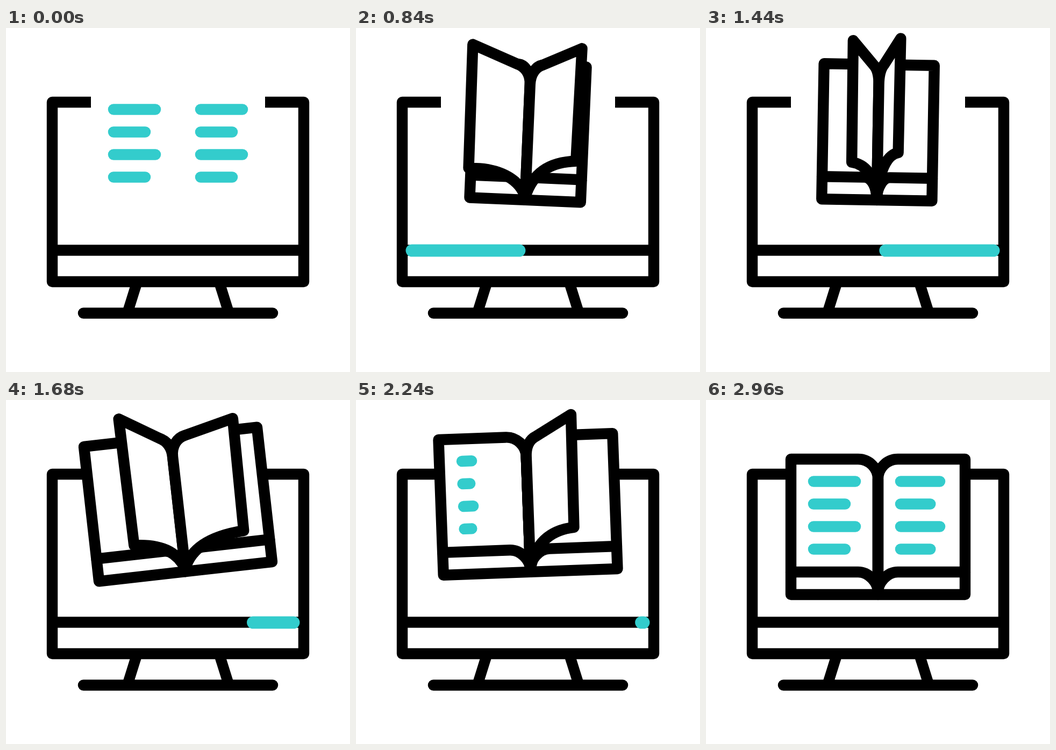
An HTML page with a canvas for the animation above (3000 ms loop, 640 px wide and 640 px high).

```html
<!DOCTYPE html>
<html lang="en">
<head>
<meta charset="utf-8">
<title>Online reading</title>
<style>
  html, body { margin: 0; width: 100%; height: 100%; overflow: hidden; background: #fff; }
  canvas { display: block; width: 100vmin; height: 100vmin; }
</style>
</head>
<body>
<canvas id="stage" width="640" height="640"></canvas>
<script>
const ctx = document.getElementById('stage').getContext('2d');
const LOOP = 3000, STEP = 40;
const INK = '#000', TEAL = '#33cccc';
const W = 162, TOP = -126, FOOT = 126, PAGE_FOOT = 84, BEND = 37;
const BOOK_IN = 620;

const clamp = v => Math.max(0, Math.min(1, v));
const mix = (a, b, u) => a + (b - a) * u;
const ramp = (t, a, b) => clamp((t - a) / (b - a));
const smooth = (t, a, b) => { const u = ramp(t, a, b); return u * u * (3 - 2 * u); };

// Monotone cubic through [time, value] keys, flat at both ends and at extremes.
function track(t, keys) {
  const n = keys.length - 1;
  if (t <= keys[0][0]) return keys[0][1];
  if (t >= keys[n][0]) return keys[n][1];
  let i = 0;
  while (t > keys[i + 1][0]) i++;
  const slope = j => (keys[j + 1][1] - keys[j][1]) / (keys[j + 1][0] - keys[j][0]);
  const tangent = j => {
    if (j === 0 || j === n) return 0;
    const a = slope(j - 1), b = slope(j);
    return a * b <= 0 ? 0 : 2 * a * b / (a + b);
  };
  const [t0, v0] = keys[i], [t1, v1] = keys[i + 1];
  const d = t1 - t0, u = (t - t0) / d, u2 = u * u, u3 = u2 * u;
  return v0 * (2 * u3 - 3 * u2 + 1) + v1 * (3 * u2 - 2 * u3)
    + d * (tangent(i) * (u3 - 2 * u2 + u) + tangent(i + 1) * (u3 - u2));
}

const TILT = [[640, 0], [1200, 8.4], [1680, -6.4], [2240, -2.1], [2440, 0]];
const SPREAD = [[620, 1], [1160, 0], [1210, 0], [1600, 1]];
const LEFT = [[620, W], [1140, 26], [1200, 26], [1680, 92], [2020, W]];
const RIGHT = [[620, W], [1160, -26], [1230, -26], [1680, 119], [1960, 70],
  [2070, 70], [2240, 86], [2320, 106], [2440, W]];
const BAR_TAIL = [[900, 0], [1200, 0.195], [1680, 0.825], [2240, 0.99], [2360, 1]];

function stroke(width = 20, color = INK, cap = 'butt') {
  ctx.lineWidth = width;
  ctx.strokeStyle = color;
  ctx.lineCap = cap;
  ctx.lineJoin = 'round';
  ctx.stroke();
}

function line(points, width, color, cap) {
  ctx.beginPath();
  points.forEach(([x, y]) => ctx.lineTo(x, y));
  stroke(width, color, cap);
}

function monitor() {
  line([[158, 138], [86, 138], [86, 472], [554, 472], [554, 138], [482, 138]], 20.4);
  line([[86, 413.5], [554, 413.5]], 20.4);
  line([[242.5, 477], [226.5, 528]]);
  line([[398, 477], [414, 528]]);
  line([[144, 530.5], [496, 530.5]], 20.5, INK, 'round');
}

function progress(t) {
  const head = smooth(t, 318, 1415), tail = track(t, BAR_TAIL);
  if (head <= 0 || tail >= 1) return;
  const at = p => 104 + 431 * p;
  line([[at(tail), 414], [at(head) + 0.01, 414]], 23, TEAL, 'round');
}

// A leaf from the spine to outer edge x, its outer corners lifted.
function leaf(x, liftTop, liftFoot) {
  const bx = x * BEND / W, curl = Math.min(1, liftFoot / 17);
  const footX = x * mix(1, 0.975, curl), footY = PAGE_FOOT - liftFoot;
  const end = PAGE_FOOT + BEND, drop = end - footY;
  ctx.beginPath();
  ctx.moveTo(x, TOP - liftTop);
  ctx.lineTo(bx, TOP);
  ctx.bezierCurveTo(bx * 0.45, TOP + liftTop * 0.13, 0, TOP + BEND * 0.45, 0, TOP + BEND);
  ctx.lineTo(0, end);
  ctx.bezierCurveTo(
    footX * 0.14 * curl, footY + drop * mix(0.55, 0.27, curl),
    mix(bx * 0.45, footX * 0.56, curl), footY + drop * 0.04 * curl,
    mix(bx, footX, curl), footY);
  ctx.lineTo(footX, footY);
  ctx.closePath();
  ctx.fillStyle = '#fff';
  ctx.fill();
  stroke(20.4);
}

function cover(x) {
  ctx.fillStyle = '#fff';
  ctx.fillRect(Math.min(0, x), PAGE_FOOT, Math.abs(x), FOOT - PAGE_FOOT);
  leaf(x, 0, 0);
  line([[x, PAGE_FOOT], [x, FOOT], [0, FOOT]], 20.4);
}

function leftLeaf(w) {
  if (w > W - 0.1) return;
  leaf(-w, 44 * Math.min(1, (W - w) / 70), 33 * (W - w) / 136);
}

function rightLeaf(x) {
  if (x > W - 0.1) return;
  const high = x > 60, u = (60 - x) / 86;
  const lift = (W - x) / 2;
  leaf(x, high ? lift : 51 - 7 * u, high ? lift : 51 - 18 * u);
}

function book(t) {
  const k = track(t, SPREAD);
  if (k > 0.01) {
    cover(-W * k);
    cover(W * k);
  }
  line([[0, TOP + BEND], [0, FOOT]], 20.4, INK, 'round');
  leftLeaf(track(t, LEFT));
  rightLeaf(track(t, RIGHT));
}

function textColumn(x, from, to) {
  if (to - from < 0.005) return;
  for (let i = 0; i < 4; i++) {
    const len = i % 2 ? 59 : 78, y = -84.5 + 42 * i;
    line([[x + len * from, y], [x + len * to, y]], 20.5, TEAL, 'round');
  }
}

function draw(t) {
  ctx.fillStyle = '#fff';
  ctx.fillRect(0, 0, 640, 640);
  monitor();
  progress(t);

  const rise = 42 * (smooth(t, 80, 680) - smooth(t, 2340, 2880));
  ctx.save();
  ctx.translate(320, 236 - rise);
  ctx.rotate(track(t, TILT) * Math.PI / 180);
  if (t >= BOOK_IN) book(t);
  if (t < 1000) {
    textColumn(-120, ramp(t, 80, 617), 1);
    textColumn(42, ramp(t, 340, 692), 1);
  } else {
    textColumn(-120, 0, ramp(t, 2142, 2565));
    textColumn(42, 0, ramp(t, 2398, 2998));
  }
  ctx.restore();
}

const start = performance.now();
function tick() {
  const t = (performance.now() - start) % LOOP;
  draw(Math.floor(t / STEP) * STEP);
  requestAnimationFrame(tick);
}
tick();
</script>
</body>
</html>
```
